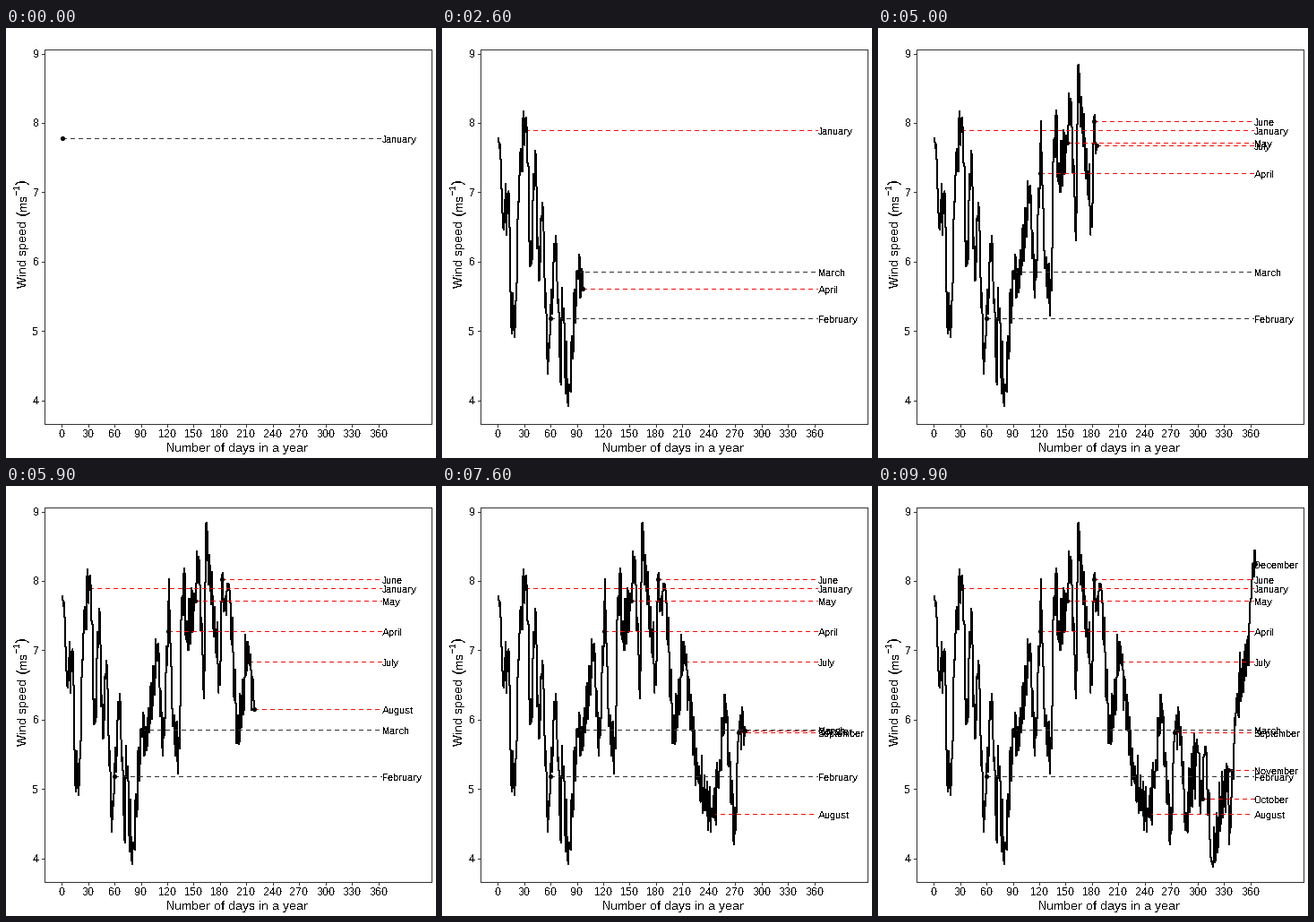
A matplotlib script that plays this animation: 480 px wide and 480 px high, repeating every 10 s.

```python
import matplotlib.pyplot as plt
import numpy as np
from matplotlib.animation import FuncAnimation

SIZE, DPI, FRAMES, DAYS = 480, 80, 100, 366
INK, GREY, RED = "black", "#333333", "#ff0000"
LEFT, RIGHT, TOP, BOTTOM = 42.5, 474.5, 23.5, 441.5
LABEL_X = 420

# month, last day, wind speed on that day
MONTHS = [
    ("January", 31, 7.89), ("February", 60, 5.18), ("March", 91, 5.86),
    ("April", 121, 7.27), ("May", 152, 7.72), ("June", 182, 8.03),
    ("July", 213, 6.83), ("August", 244, 4.64), ("September", 274, 5.81),
    ("October", 305, 4.86), ("November", 335, 5.27), ("December", 366, 8.25),
]
DARK_MONTHS = ("February", "March")

# main peaks and lulls: day -> speed
TURNS = {
    1: 7.78, 3: 7.7, 6: 6.5, 13: 6.97, 15: 5.2, 20: 5.1, 25: 7.33,
    33: 7.94, 37: 5.92, 43: 7.6, 47: 5.72, 51: 6.85, 57: 4.37, 66: 6.38,
    72: 4.22, 73: 5.63, 80: 3.91, 95: 5.6, 110: 7.1, 115: 5.47, 122: 8.03,
    126: 5.9, 134: 5.58, 136: 7.65, 140: 8.1, 141: 7.15, 156: 8.35,
    162: 6.3, 164: 8.82, 169: 8.0, 180: 6.5, 185: 7.63, 190: 7.95,
    201: 5.65, 212: 7.13, 228: 5.1, 252: 5.27, 259: 6.26, 269: 4.2,
    281: 5.9, 286: 4.4, 300: 5.6, 309: 5.62, 311: 5.0, 316: 3.95,
    336: 4.2, 344: 6.2, 356: 6.8, 361: 7.75, 365: 8.45,
}


def px(day):
    return 62.14 + 0.9818 * day


def py(speed):
    return 28.5 + (9 - speed) * 77.4


def daily_speeds():
    """Join the turning points and add gusts on the days between them."""
    known = TURNS | {end: speed for _, end, speed in MONTHS}
    marks = np.array(sorted(known))
    days = np.arange(1, DAYS + 1)
    base = np.interp(days, marks, [known[m] for m in marks])
    gap = np.abs(days[:, None] - marks).min(axis=1)
    rng = np.random.default_rng(7)
    gust = rng.uniform(0.25, 0.6, DAYS) * np.cos(2 * np.pi * days / 2.9)
    return days, base + gust * np.minimum(gap, 2) / 2


days, speeds = daily_speeds()

plt.rcParams.update({
    "font.family": "Liberation Sans",
    "text.antialiased": False,
    "text.hinting": "default",
    "text.hinting_factor": 1,
})
fig = plt.figure(figsize=(SIZE / DPI, SIZE / DPI), dpi=DPI, facecolor="white")
ax = fig.add_axes([0, 0, 1, 1])
ax.set(xlim=(0, SIZE), ylim=(SIZE, 0))
ax.axis("off")


def pt(pixels):
    return pixels * 72 / DPI


def stroke(xs, ys, color, **kw):
    return ax.plot(xs, ys, color=color, lw=pt(1), antialiased=False, **kw)[0]


def write(x, y, text, size, ha="center", **kw):
    return ax.text(x, y, text, size=pt(size), color=INK, ha=ha,
                   va="baseline", **kw)


def draw_axes():
    stroke([LEFT, RIGHT, RIGHT, LEFT, LEFT],
           [TOP, TOP, BOTTOM, BOTTOM, TOP], GREY, zorder=1)
    for day in range(0, 361, 30):
        stroke([px(day)] * 2, [BOTTOM, BOTTOM + 3], GREY)
        write(px(day), 457, str(day), 12)
    for speed in range(4, 10):
        stroke([LEFT - 3, LEFT], [py(speed)] * 2, GREY)
        write(37, py(speed) + 4.5, str(speed), 12, "right")
    write(258, 473, "Number of days in a year", 14)
    for x, y, text, size in [(23, 290, "Wind speed", 14), (23, 209, "(", 17),
                             (23, 204, "ms", 14), (15, 186, "\u22121", 10),
                             (23, 175, ")", 17)]:
        write(x, y, text, size, "left", rotation=90, rotation_mode="anchor")


draw_axes()
curve = stroke([], [], INK, zorder=3, solid_joinstyle="bevel")
parts = []
for name, _, _ in MONTHS:
    guide = stroke([], [], RED, zorder=4, dashes=(4, 4),
                   dash_capstyle="butt")
    dot = ax.plot([], [], "o", color=INK, ms=pt(5.2), mew=0, zorder=5)[0]
    label = write(LABEL_X, 0, name, 11, "left", zorder=6)
    parts.append((guide, dot, label))


def guide_color(name, moving):
    early = name == "January" and moving
    return GREY if early or name in DARK_MONTHS else RED


def update(frame):
    now = 1 + frame * (DAYS - 1) / (FRAMES - 1)
    past = days < now
    xs = np.append(days[past], now)
    ys = np.append(speeds[past], np.interp(now, days, speeds))
    curve.set_data(px(xs), py(ys))

    start = 1
    for (name, end, _), (guide, dot, label) in zip(MONTHS, parts):
        shown = now >= start
        day = min(now, end)
        x, y = px(day), py(np.interp(day, days, speeds))
        guide.set_data([x, max(x, LABEL_X - 1)], [y, y])
        guide.set_color(guide_color(name, now < end))
        dot.set_data([x], [y])
        label.set_y(y + 5)
        for item in (guide, dot, label):
            item.set_visible(shown)
        start = end + 1
    return [curve, *(item for part in parts for item in part)]


anim = FuncAnimation(fig, update, frames=FRAMES, interval=100,
                     repeat=True, repeat_delay=0, blit=False)
plt.show()
```
